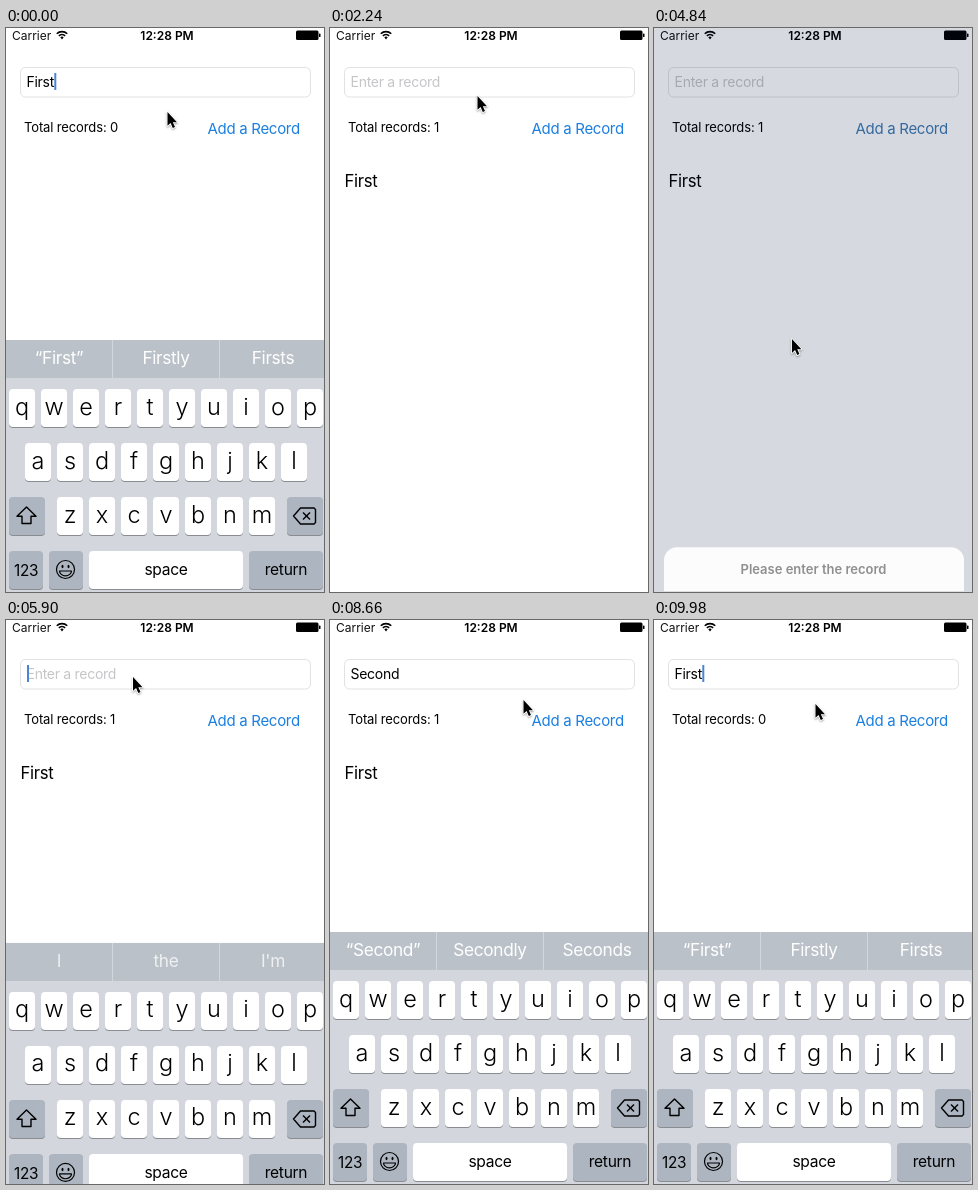
Recreate the animation shown at these times as an HTML page with a canvas. Size 318 px wide and 564 px high, loop 10000 ms.

```html
<!DOCTYPE html>
<html lang="en">
<head>
<meta charset="utf-8">
<title>Add a record</title>
<style>
html, body { margin: 0; width: 100%; height: 100%; overflow: hidden; background: #fff; }
canvas { display: block; width: 318px; height: 564px; }
</style>
</head>
<body>
<canvas id="stage"></canvas>
<script>
const W = 318, H = 564, LOOP = 10000, RESET = 9980;
const BLUE = [27, 127, 224];
const canvas = document.getElementById('stage');
const ctx = canvas.getContext('2d');
const dpr = window.devicePixelRatio || 1;
canvas.width = W * dpr;
canvas.height = H * dpr;

// Moments of the story, in ms
const ADD1 = 620, ALERT_IN = 2760, ALERT_OUT = 4730, FOCUS = 5628, ADD2 = 9110;
const KEYS = [6500, 6850, 7100, 7400, 7820, 8000];
const WORD = 'Second';
const PRESSES = [[520, 640], [2580, 2700], [9000, 9120]];
const HINTS = [
  ['I', 'the', 'I\'m'],
  ['“S”', 'So', 'See'],
  ['“Se”', 'See', 'Send'],
  ['“Sec”', 'Second', 'Security'],
  ['“Seco”', 'Second', 'Seconds'],
  ['“Secon”', 'Second', 'Seconds'],
  ['“Second”', 'Secondly', 'Seconds']
];
// time, x, y of the pointer tip
const PATH = [
  [40, 161, 84], [460, 248, 98], [1060, 248, 98], [1520, 143, 51], [1980, 143, 51],
  [2100, 133, 62], [2240, 147, 68], [2520, 224, 90], [3960, 224, 90], [4480, 160, 520],
  [4640, 160, 520], [5070, 110, 57], [5500, 126.5, 57], [6050, 126.5, 57], [6380, 150, 476],
  [8050, 150, 476], [8640, 193, 80], [8680, 193, 80], [8900, 245, 97], [9400, 245, 97],
  [9800, 150, 60]
];

const clamp = v => Math.max(0, Math.min(1, v));
const mix = (a, b, p) => a + (b - a) * p;
const rgb = c => `rgb(${c.map(Math.round).join(',')})`;

// Critically damped move from 0 to 1
function spring(ms) {
  const x = Math.max(0, ms) * 0.018;
  return 1 - (1 + x) * Math.exp(-x);
}

function text(str, x, y, size, color, { align = 'left', weight = 400, track = -0.02 } = {}) {
  ctx.font = `${weight} ${size}px Inter, Roboto, sans-serif`;
  ctx.letterSpacing = `${track * size}px`;
  ctx.textAlign = align;
  ctx.fillStyle = color;
  ctx.fillText(str, x, y);
}

function box(x, y, w, h, r, fill) {
  ctx.beginPath();
  ctx.roundRect(x, y, w, h, r);
  ctx.fillStyle = fill;
  ctx.fill();
}

function trace(points, closed = true) {
  ctx.beginPath();
  points.forEach(([x, y]) => ctx.lineTo(x, y));
  if (closed) ctx.closePath();
}

function pointerAt(t) {
  const i = PATH.findIndex(k => k[0] > t);
  if (i === 0) return PATH[0].slice(1);
  if (i < 0) return PATH[PATH.length - 1].slice(1);
  const a = PATH[i - 1], b = PATH[i];
  const u = (t - a[0]) / (b[0] - a[0]);
  const p = u * u * (3 - 2 * u);
  return [mix(a[1], b[1], p), mix(a[2], b[2], p)];
}

function drawStatus() {
  text('Carrier', 6, 11.5, 12, '#111', { track: 0 });
  text('12:28 PM', 161, 11.5, 12, '#000', { align: 'center', weight: 600, track: 0 });
  ctx.strokeStyle = '#000';
  ctx.lineWidth = 1.7;
  for (const r of [4.4, 7.4]) {
    ctx.beginPath();
    ctx.arc(56, 11, r, -Math.PI * 0.75, -Math.PI * 0.25);
    ctx.stroke();
  }
  ctx.beginPath();
  ctx.moveTo(56, 11.5);
  ctx.arc(56, 11, 2.4, -Math.PI * 0.75, -Math.PI * 0.25);
  ctx.fillStyle = '#000';
  ctx.fill();
  box(290, 2.5, 22.5, 9.5, 1.5, '#000');
  box(313, 5.5, 1.5, 3.5, 0.6, '#000');
}

function pressAlpha(t) {
  let a = 1;
  for (const [down, up] of PRESSES) {
    if (t >= down && t < up) a = 0.25;
    else if (t >= up) a = Math.min(a, mix(0.25, 1, clamp((t - up) / 470)));
  }
  return a;
}

function caretOn(t) {
  if (t < ADD1) return t < 500;
  if (t < FOCUS || t >= ADD2) return false;
  const last = [FOCUS + 40, ...KEYS].filter(k => k <= t).pop() || FOCUS;
  return (t - last) % 1000 < 500;
}

function drawForm(t, typed, alert) {
  ctx.beginPath();
  ctx.roundRect(14.5, 39.5, 290, 29.5, 5);
  ctx.strokeStyle = '#e2e2e2';
  ctx.lineWidth = 1;
  ctx.stroke();
  text(typed || 'Enter a record', 20.5, 58.5, 14, typed ? '#000' : '#c6c6c9');
  if (caretOn(t)) {
    const x = typed ? 20.8 + ctx.measureText(typed).width : 21;
    ctx.fillStyle = '#4a84d4';
    ctx.fillRect(x, 45, 2, 17);
  }
  const count = t < ADD1 ? 0 : t < ADD2 ? 1 : 2;
  text('Total records: ' + count, 18, 104.3, 13, '#000', { track: -0.01 });
  ctx.globalAlpha = pressAlpha(t);
  const tint = BLUE.map(c => mix(c, 112, alert));
  text('Add a Record', 201.5, 105.5, 15, rgb(tint));
  ctx.globalAlpha = 1;
  ['First', 'Second'].slice(0, count).forEach((s, i) =>
    text(s, 14.5, 159 + 44 * i, 16.7, '#000'));
}

function key(x, y, w, dark) {
  box(x, y + 1, w, 38, 4, '#898c91');
  box(x, y, w, 38, 4, dark ? '#adb5c0' : '#fff');
}

function letters(row, x, y) {
  [...row].forEach((c, i) => {
    key(x + 32 * i, y, 26);
    text(c, x + 13 + 32 * i, y + 25.5, 23.5, '#000', { align: 'center', weight: 350, track: 0 });
  });
}

function drawShift() {
  trace([[20.5, 479], [30, 488.3], [25, 488.3], [25, 495.5], [16, 495.5], [16, 488.3], [11, 488.3]]);
  ctx.stroke();
}

function drawDelete() {
  trace([[287.5, 488], [294.5, 480], [308, 480], [309.5, 481.5], [309.5, 494.5], [308, 496], [294.5, 496]]);
  ctx.stroke();
  trace([[297, 484.5], [304, 491.5]], false);
  ctx.stroke();
  trace([[304, 484.5], [297, 491.5]], false);
  ctx.stroke();
}

function drawSmiley() {
  ctx.lineWidth = 1.2;
  ctx.beginPath();
  ctx.arc(59.5, 541.5, 9, 0, 7);
  ctx.stroke();
  for (const x of [56.5, 62.5]) {
    ctx.beginPath();
    ctx.ellipse(x, 538.5, 1, 1.7, 0, 0, 7);
    ctx.fillStyle = '#000';
    ctx.fill();
  }
  ctx.beginPath();
  ctx.ellipse(59.5, 543, 6, 4.8, 0, 0, Math.PI);
  ctx.closePath();
  ctx.stroke();
}

function drawKeyboard(offset, hints, fade) {
  if (offset > 251.7) return;
  ctx.save();
  ctx.translate(0, offset);
  ctx.fillStyle = '#d3d6dc';
  ctx.fillRect(0, 312, W, 252);
  ctx.fillStyle = '#bac1c8';
  ctx.fillRect(0, 312, W, 38);
  ctx.fillStyle = '#d3d7dc';
  ctx.fillRect(106, 312, 1, 38);
  ctx.fillRect(213, 312, 1, 38);
  ctx.globalAlpha = fade;
  hints.forEach((s, i) =>
    text(s, 53 + 107 * i, 335.7, 17.3, '#fff', { align: 'center' }));
  ctx.globalAlpha = 1;

  letters('qwertyuiop', 3, 361);
  letters('asdfghjkl', 19, 415);
  letters('zxcvbnm', 51, 469);
  key(3, 469, 36, true);
  key(281, 469, 36, true);
  key(3, 523, 34, true);
  key(43, 523, 34, true);
  key(83, 523, 154);
  key(243, 523, 74, true);
  const mid = { align: 'center' };
  text('123', 20, 548, 15.3, '#000', mid);
  text('space', 160, 547, 15.6, '#000', mid);
  text('return', 280, 547, 15.6, '#000', mid);
  ctx.strokeStyle = '#000';
  ctx.lineWidth = 1.4;
  ctx.lineJoin = 'round';
  drawShift();
  drawDelete();
  drawSmiley();
  ctx.restore();
}

function drawAlert(t, p) {
  if (p < 0.002) return;
  // The veil turns slightly blue while leaving
  const out = t > ALERT_OUT ? 1 - p : 0;
  ctx.fillStyle = `rgba(0,${Math.round(36 * out)},${Math.round(92 * out)},${0.395 * p})`;
  ctx.fillRect(0, 0, W, H);
  ctx.save();
  ctx.translate(0, 110 * (1 - p));
  box(10, 454, 300, 101, 13, '#fcfcfc');
  if (t > 4530 && t < ALERT_OUT) box(10, 499, 300, 56, [0, 0, 13, 13], '#ececec');
  ctx.fillStyle = '#d4d4d4';
  ctx.fillRect(10, 498, 300, 1);
  text('Please enter the record', 159.5, 480.3, 13, '#8f8f8f', { align: 'center', weight: 600, track: 0 });
  text('OK', 159.5, 533.7, 19.5, 'rgb(30,122,215)', { align: 'center', track: 0 });
  ctx.restore();
}

function drawPointer(t) {
  if (t >= KEYS[0] && t < 8050) return;
  const [x, y] = pointerAt(t);
  ctx.save();
  ctx.translate(x, y);
  trace([[0.5, 0], [0.5, 13.8], [3.6, 11], [5.8, 16], [8, 15], [5.8, 10.2], [10, 10.2]]);
  ctx.shadowColor = 'rgba(0,0,0,.35)';
  ctx.shadowBlur = 2 * dpr;
  ctx.shadowOffsetY = dpr;
  ctx.strokeStyle = '#fff';
  ctx.lineWidth = 1.8;
  ctx.lineJoin = 'round';
  ctx.stroke();
  ctx.shadowColor = 'transparent';
  ctx.fillStyle = '#000';
  ctx.fill();
  ctx.restore();
}

function render(t) {
  const n = t < ADD2 ? KEYS.filter(k => k <= t).length : 0;
  const typed = t < ADD1 ? 'First' : WORD.slice(0, n);
  const hints = t < ADD1 ? ['“First”', 'Firstly', 'Firsts'] : HINTS[n];
  const since = t < ADD1 ? -1000 : [ADD1, FOCUS, ...KEYS, ADD2].filter(k => k <= t).pop();
  const shown = t < FOCUS ? 1 - spring(t - ADD1)
    : t < ADD2 ? spring(t - FOCUS) : 1 - spring(t - ADD2);
  const alert = t < ALERT_OUT ? spring(t - ALERT_IN) : 1 - spring(t - ALERT_OUT);

  ctx.setTransform(dpr, 0, 0, dpr, 0, 0);
  ctx.fillStyle = '#fff';
  ctx.fillRect(0, 0, W, H);
  drawStatus();
  drawForm(t, typed, alert);
  drawKeyboard(252 * (1 - shown), hints, clamp((t - since) / 360));
  drawAlert(t, alert);
  drawPointer(t);
}

function tick() {
  const t = performance.now() % LOOP;
  render(t >= RESET ? 0 : t);
  requestAnimationFrame(tick);
}
tick();
</script>
</body>
</html>
```
